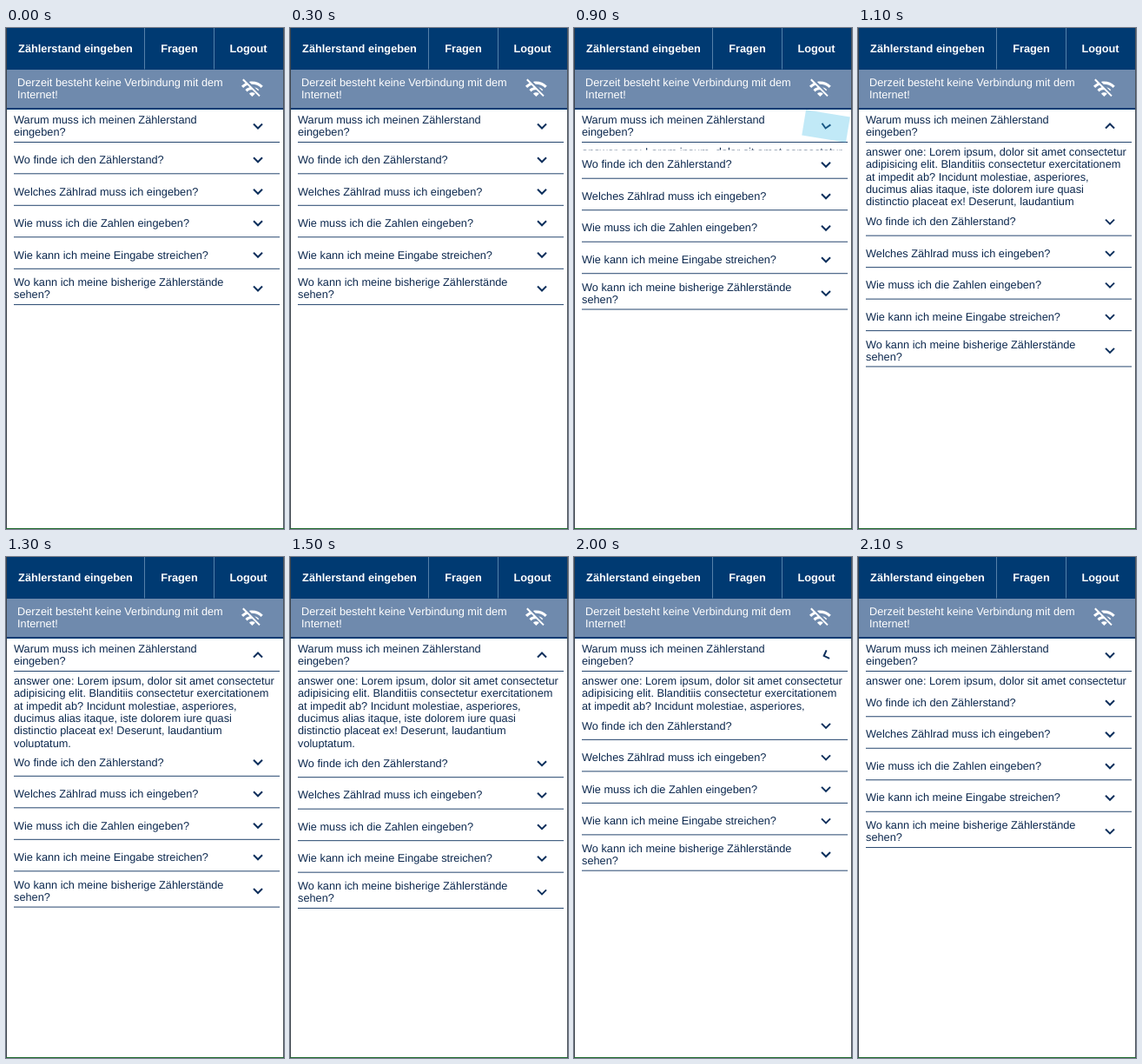
Write an HTML page that moves like this. It is 320 by 577 pixels and loops after 2200 ms.

```html
<!DOCTYPE html>
<html lang="de">
<head>
<meta charset="utf-8">
<title>Fragen</title>
<style>
  html, body { margin: 0; width: 100%; height: 100%; overflow: hidden; background: #fff; }
  svg { display: block; width: 100%; height: 100%; }
  text { font: 12.75px "Liberation Sans", Arial, sans-serif; fill: #0c284e; text-rendering: geometricPrecision; }
  .nav text { font-weight: bold; fill: #fff; text-anchor: middle; }
  .banner text { fill: #fff; }
</style>
</head>
<body>
<svg id="stage" viewBox="0 0 320 577" xmlns="http://www.w3.org/2000/svg">
  <defs><clipPath id="fold"><rect id="foldBox" x="0" y="132" width="320" height="3"/></clipPath></defs>
  <rect width="320" height="577" fill="#fff"/>
  <g class="nav">
    <rect width="320" height="48" fill="#003a72"/>
    <path d="M159.5 0V47.5M239.5 0V47.5" stroke="#5580aa"/>
    <text x="80" y="28">Zählerstand eingeben</text>
    <text x="199.5" y="28">Fragen</text>
    <text x="279" y="28">Logout</text>
  </g>
  <g class="banner">
    <rect y="48" width="320" height="45" fill="#6f8aad"/>
    <rect y="92" width="320" height="2" fill="#003a72"/>
    <text x="13" y="66.5">Derzeit besteht keine Verbindung mit dem</text>
    <text x="13" y="80.8">Internet!</text>
    <path transform="translate(269.8 56.5) scale(1.13)" fill="#fff" d="M22.99 9C19.15 5.16 13.8 3.76 8.84 4.78l2.52 2.52c3.47-.17 6.99 1.05 9.63 3.7l2-2zm-4 4c-1.29-1.29-2.84-2.13-4.49-2.56l3.53 3.53.96-.97zM2 3.05L5.07 6.1C3.6 6.82 2.22 7.78 1 9l1.99 2c1.24-1.24 2.67-2.16 4.2-2.77l2.24 2.24C7.81 10.89 6.27 11.73 5 13v.01L6.99 15c1.36-1.36 3.14-2.04 4.92-2.06L18.98 20l1.27-1.26L3.29 1.79 2 3.05zM9 17l3 3 3-3c-1.65-1.66-4.34-1.66-6 0z"/>
  </g>
  <g id="first"></g>
  <g id="answer" clip-path="url(#fold)"></g>
  <g id="rest"></g>
  <path d="M.5 0V577" stroke="#3c444c"/>
  <path d="M319.5 0V577" stroke="#4c545c"/>
  <path d="M0 576.5H320" stroke="#1d6a2c"/>
</svg>
<script>
const LOOP = 2200, STEP = 100;
const OPEN_AT = 871, CLOSE_AT = 1879, TURN_MS = 210;
const ANSWER_HEIGHT = 86;

const $ = id => document.getElementById(id);

function add(parent, tag, attrs, text = '') {
  const el = document.createElementNS('http://www.w3.org/2000/svg', tag);
  for (const key in attrs) el.setAttribute(key, attrs[key]);
  el.textContent = text;
  return parent.appendChild(el);
}

function addLines(parent, lines, baseline, pitch) {
  lines.forEach((line, i) => add(parent, 'text', { x: 9, y: baseline + i * pitch }, line));
}

// Adds one question and returns the group that turns around its arrow.
function addQuestion(parent, lines, baseline, arrowY, ruleY) {
  addLines(parent, lines, baseline, 14.2);
  add(parent, 'path', { d: `M9 ${ruleY}H315`, stroke: '#24456e' });
  const place = add(parent, 'g', { transform: `translate(290 ${arrowY})` });
  const turn = add(place, 'g', {});
  add(turn, 'path', {
    d: 'M-5 -2.5L0 2.5L5 -2.5', fill: 'none', stroke: '#0c2f5c', 'stroke-width': 2
  });
  return turn;
}

const arrow = addQuestion($('first'),
  ['Warum muss ich meinen Zählerstand', 'eingeben?'], 109.5, 113, 131.5);
const flash = add(arrow, 'rect', {
  x: -25.7, y: -14.8, width: 51.4, height: 29.6, fill: '#33b5e5', 'fill-opacity': 0.3
});

addLines($('answer'), [
  'answer one: Lorem ipsum, dolor sit amet consectetur',
  'adipisicing elit. Blanditiis consectetur exercitationem',
  'at impedit ab? Incidunt molestiae, asperiores,',
  'ducimus alias itaque, iste dolorem iure quasi',
  'distinctio placeat ex! Deserunt, laudantium',
  'voluptatum.'
], 146.8, 14.35);

[
  'Wo finde ich den Zählerstand?',
  'Welches Zählrad muss ich eingeben?',
  'Wie muss ich die Zahlen eingeben?',
  'Wie kann ich meine Eingabe streichen?'
].forEach((question, i) => {
  const y = i * 36.5;
  addQuestion($('rest'), [question], 156 + y, 151.8 + y, 167.8 + y);
});
addQuestion($('rest'),
  ['Wo kann ich meine bisherige Zählerstände', 'sehen?'], 297.2, 300, 318.6);

// Critically damped spring from 0 to 1.
function spring(ms) {
  const x = 0.014 * Math.max(0, ms);
  return 1 - (1 + x) * Math.exp(-x);
}

function easeInOut(ms) {
  const u = Math.min(1, Math.max(0, ms / TURN_MS));
  return u * u * (3 - 2 * u);
}

function render(time) {
  const t = Math.floor(time % LOOP / STEP) * STEP;
  const sinceOpen = t - OPEN_AT, sinceClose = t - CLOSE_AT;
  const height = ANSWER_HEIGHT * (spring(sinceOpen) - spring(sinceClose));
  const angle = 180 * (easeInOut(sinceOpen) - easeInOut(sinceClose));
  const tapped = [sinceOpen, sinceClose].some(ms => ms >= 0 && ms < 100);

  $('rest').setAttribute('transform', `translate(0 ${height.toFixed(2)})`);
  $('foldBox').setAttribute('height', (3 + height).toFixed(2));
  arrow.setAttribute('transform', `rotate(${angle.toFixed(2)})`);
  flash.setAttribute('visibility', tapped ? 'visible' : 'hidden');
}

const start = performance.now();
function tick() {
  render(performance.now() - start);
  requestAnimationFrame(tick);
}
tick();
</script>
</body>
</html>
```
